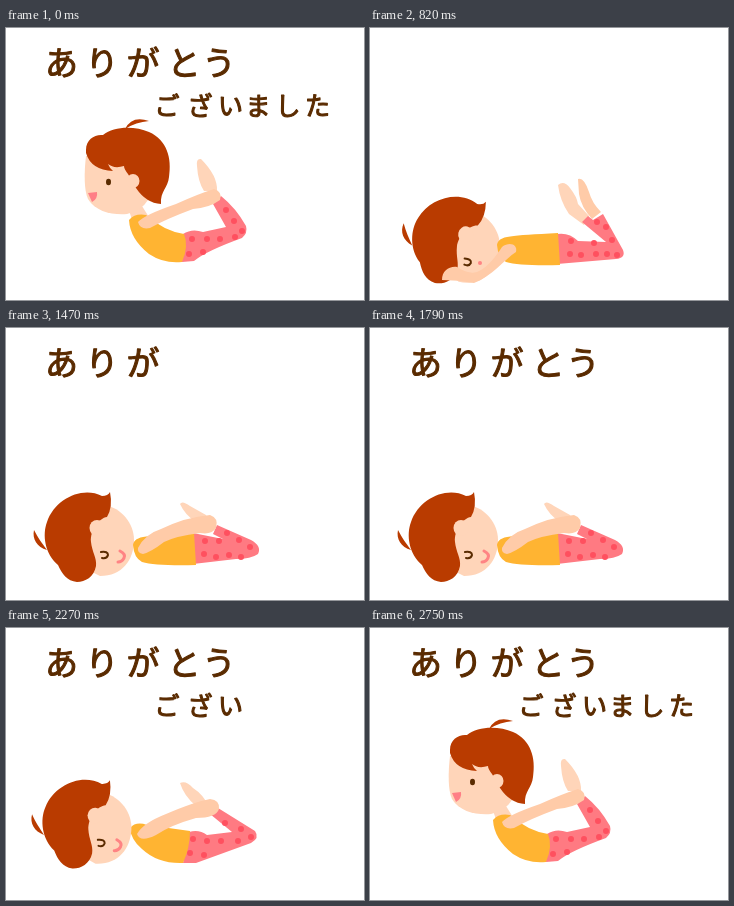
Write an HTML page that moves like this. It is 358 px wide and 272 px high and loops after 2.91 s.

```html
<!DOCTYPE html>
<html lang="ja">
<head>
<meta charset="utf-8">
<style>
html, body { margin: 0; width: 100%; height: 100%; overflow: hidden; background: #fff }
svg { display: block; width: 358px; height: 272px }
text { font-family: "Noto Sans CJK JP", "Noto Sans CJK", sans-serif; font-weight: 500; text-anchor: middle;
  fill: #5a2b00; stroke: #5a2b00; stroke-width: 1.1; stroke-linejoin: round }
.hair { fill: #b93b00 }
.skin { fill: #ffd5b9 }
.limb { fill: #ffcba8 }
.top { fill: #ffb432 }
.pants { fill: #ff7a82 }
.dots { fill: none; stroke: #ff505f; stroke-width: 6; stroke-linecap: round }
.eye { fill: none; stroke: #5a2b00; stroke-width: 2; stroke-linecap: round }
.smile { fill: none; stroke: #ff8484; stroke-width: 3; stroke-linecap: round }
.pose { display: none }
</style>
</head>
<body>
<svg viewBox="0 0 358 272">
  <defs>
    <g id="head">
      <path class="skin" d="M99 177C115 180 128 195 128 212C128 232 116 248 94 248L78 240L80 188Z"/>
      <path class="hair" d="M104 164Q107 179 101 189C93 190 84 202 85 214C86 224 91 230 90 238C88 249 79 254 71 254C61 253 56 246 52 237C39 226 36 207 41 194C49 171 76 158 96 168Q102 168 104 164Z"/>
      <path class="hair" d="M28 202C26 211 31 219 41 222C36 215 32 210 28 202Z"/>
      <ellipse class="skin" cx="91" cy="200" rx="7.5" ry="8"/>
      <path class="eye" d="M95 224Q102 223 102 227Q101 231 96 230"/>
    </g>
    <path id="smile" class="smile" d="M114 223Q120 226 118 230Q116 234 112 234"/>
    <g id="down"><use href="#head" transform="translate(2 2) rotate(12 72 215)"/></g>
    <path id="chest" class="top" d="M127 217C129 207 140 208 188 205L190 237Q150 238 136 234Q128 230 127 217Z"/>
    <g id="rest">
      <use href="#down"/>
      <circle cx="110" cy="235" r="2" fill="#ff8484"/>
      <use href="#chest"/>
      <path class="limb" d="M132 219C140 213 148 217 146 224C135 231 121 249 104 255Q88 252 72 252C72 243 79 238 87 239C96 245 104 246 109 243C119 238 126 228 132 219Z"/>
    </g>
    <g id="hold">
      <path class="skin" d="M174 176Q176 172 184 178L200 187L207 201L190 194Q179 187 174 176Z"/>
      <path class="pants" d="M187 205L217 211L207 206L211 197L245 212Q256 218 252 226Q245 231 230 231L187 236Z"/>
      <path class="dots" d="M198 226h0M210 229h0M213 213h0M223 227h0M233 212h0M244 219h0M221 205h0M199 213h0M235 229h0"/>
      <use href="#chest"/>
      <path class="limb" d="M132 220Q139 206 155 201Q180 189 204 187Q213 190 210 200Q206 207 194 205Q170 208 158 214Q145 224 137 226Q131 225 132 220Z"/>
    </g>
  </defs>

  <g class="pose">
    <path class="skin" d="M284 217Q294 213 301 214L326 224Q332 227 332 231Q320 233 310 231L285 226Z"/>
    <path class="pants" d="M187 206Q199 204 208 212L286 216L286 227L187 236Z"/>
    <path class="dots" d="M200 213h0M198 227h0M210 229h0M225 216h0M225 226h0M234 228h0M246 218h0M247 228h0M262 219h0M268 226h0M280 221h0"/>
    <use href="#rest"/>
  </g>

  <g class="pose">
    <path class="skin" d="M188 157Q194 152 200 160Q207 169 208 176L219 188L214 197L199 186Q190 173 188 157Z"/>
    <path class="limb" d="M208 151Q214 149 219 164Q222 175 231 184L222 191Q211 179 209 166Z"/>
    <path class="pants" d="M187 206Q199 204 208 213L236 214L212 194L218 188L223 192L233 186L253 222Q256 230 246 231L187 236Z"/>
    <path class="dots" d="M201 213h0M200 226h0M211 227h0M224 215h0M226 226h0M236 199h0M227 194h0M237 226h0M242 212h0M247 227h0"/>
    <use href="#rest"/>
  </g>

  <g class="pose">
    <use href="#down"/>
    <use href="#hold"/>
  </g>

  <g class="pose">
    <use href="#head"/><use href="#smile"/>
    <use href="#hold"/>
  </g>

  <g class="pose">
    <path class="skin" d="M174 155Q180 152 187 160Q198 167 203 179L190 178Q178 168 174 155Z"/>
    <path class="pants" d="M183 204Q193 201 201 207L226 204L204 186L212 180L249 203Q254 210 245 215L190 235L177 235Z"/>
    <path class="dots" d="M187 211h0M184 225h0M198 227h0M201 213h0M215 213h0M219 195h0M235 201h0M232 213h0M245 209h0"/>
    <path class="top" d="M124 200Q130 193 141 197L184 203Q184 220 177 235Q152 236 136 221Q125 212 124 200Z"/>
    <g transform="translate(-4 -13) rotate(3 80 240)"><use href="#head"/><use href="#smile"/></g>
    <path class="limb" d="M131 206Q137 195 160 186Q188 174 204 171Q214 172 213 181Q210 190 190 190Q165 197 150 207Q134 215 131 206Z"/>
  </g>

  <g class="pose">
    <path class="skin" d="M195 131Q190 130 191 138Q192 154 198 163L211 163Q212 148 195 131Z"/>
    <path class="pants" d="M177 206Q186 200 197 204L220 199L207 176L215 168Q230 180 240 198Q242 205 236 210Q200 223 188 233L176 234Z"/>
    <path class="dots" d="M186 211h0M183 226h0M197 224h0M201 211h0M214 211h0M220 182h0M228 193h0M229 209h0M236 203h0"/>
    <path class="skin" d="M122 180L136 178L146 194L128 197Z"/>
    <path class="top" d="M123 192Q129 185 140 187Q158 203 178 206Q183 218 176 234Q158 236 143 226Q124 211 123 192Z"/>
    <path class="skin" d="M80 128C78 145 78 162 82 171C90 184 106 187 121 186Q136 182 142 172L130 132L100 128Z"/>
    <path class="hair" d="M80 122C80 111 89 106 97 107C108 98 129 98 143 104C161 112 166 130 163 149C162 160 154 163 155 176Q140 175 130 160L122 146Q118 141 118 138Q108 141 102 136Q104 141 107 143Q85 142 80 125Z"/>
    <path class="hair" d="M119 101Q126 87 143 93Q130 94 119 101Z"/>
    <ellipse class="skin" cx="127" cy="153" rx="6.5" ry="7"/>
    <ellipse cx="102.5" cy="154" rx="2.5" ry="3.2" fill="#5a2b00"/>
    <path d="M82 165L91 164Q92 171 86 174Z" fill="#ff7f86"/>
    <path class="limb" d="M132 194Q138 187 170 176Q192 166 208 161Q217 164 214 172Q203 180 187 181Q160 191 144 200Q134 202 132 194Z"/>
  </g>

  <text id="line1" x="55.5 96 137 178 213" y="47" font-size="33"></text>
  <text id="line2" x="161 194 224.5 252 282 311.5" y="87" font-size="25"></text>
</svg>
<script>
const LOOP = 2910;
const words = ["ありがとう", "ございました"];
const lines = [line1, line2];
const poses = [...document.querySelectorAll(".pose")];
// [start time, pose index]
const cues = [[0, 5], [160, 0], [820, 1], [1150, 2], [1310, 3], [1950, 4], [2430, 5]];
const start = performance.now();

function draw() {
  const t = (performance.now() - start) % LOOP;
  const current = cues.filter(c => c[0] <= t).pop()[1];
  poses.forEach((p, i) => p.style.display = i === current ? "inline" : "none");

  const typed = t < 160 ? 11 : Math.max(0, Math.floor((t - 1150) / 160) + 1);
  lines[0].textContent = words[0].slice(0, typed);
  lines[1].textContent = words[1].slice(0, Math.max(0, typed - 5));
  requestAnimationFrame(draw);
}
draw();
</script>
</body>
</html>
```
